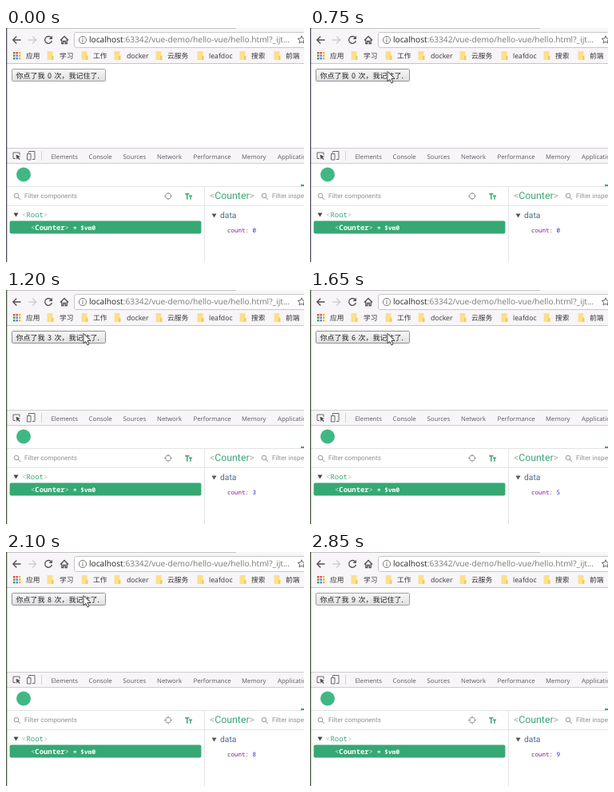
Write an HTML page that moves like this. It is 373 by 293 pixels and loops after 3.15 s.

```html
<!DOCTYPE html>
<html lang="zh-CN">
<head>
<meta charset="utf-8">
<title>Counter demo</title>
<style>
  html, body { margin: 0; width: 100%; height: 100%; overflow: hidden; background: #fff; }
  svg { display: block; width: 373px; height: 293px; }
  text { white-space: pre; text-rendering: geometricPrecision; }
  .ui { font-family: "Open Sans", "Noto Sans CJK SC", "Noto Sans CJK", sans-serif; }
  .cjk { font-family: "Noto Sans CJK SC", "Noto Sans CJK", sans-serif; }
  .vue { font-family: Roboto, sans-serif; }
  .mono { font-family: "Noto Sans Mono", "DejaVu Sans Mono", monospace; }
  .marks { font-size: 8.7px; fill: #333; }
  .tabs { font-size: 7.8px; fill: #5c5a60; }
  .hint { font-size: 8.2px; fill: #909090; }
  .line { fill: none; stroke-width: 1; shape-rendering: crispEdges; }
  .icon { fill: none; stroke: #505050; stroke-width: 1.3; }
  .edge { fill: #50505c; animation: edge 3150ms step-end infinite; }
  @keyframes edge { 28.5714% { fill: #4d5c43; } }
</style>
</head>
<body>
<svg viewBox="0 0 373 293">
  <defs>
    <linearGradient id="face" x2="0" y2="1">
      <stop stop-color="#f8f8f8"/>
      <stop offset="1" stop-color="#e0dfe2"/>
    </linearGradient>
    <g id="folder">
      <path d="M.5 0h7v11h-7z" fill="#fbe08a"/>
      <path d="M6 6h2.500v5H6z" fill="#f1cc5c"/>
    </g>
    <g id="lens" fill="none" stroke="#999" stroke-width="1">
      <circle r="2.8"/><path d="M2 2l3 3"/>
    </g>
  </defs>

  <!-- Browser bar -->
  <rect width="373" height="45" fill="#f7f5f7"/>
  <path class="line" d="M0 .5h288" stroke="#c4c2c6"/>
  <g class="icon">
    <path d="M18.5 15H9M13.3 10.5L8.8 15l4.5 4.5"/>
    <path d="M28 15h9.5M33.2 10.5l4.5 4.5l-4.5 4.5" stroke="#cfcdd0"/>
    <path d="M56.6 12.2A4.4 4.4 0 1 0 57.4 16"/>
    <path d="M57.9 9.8v4.2h-4.2z" fill="#505050" stroke="none"/>
    <path d="M68 15.5l5-5l5 5M69.8 14.5v5h2v-3h2.4v3h2v-5"/>
  </g>
  <rect x="85.5" y="5.5" width="300" height="19" rx="2.5" fill="#fff" stroke="#c9c7cb"/>
  <circle cx="96" cy="15" r="4.6" fill="none" stroke="#777"/>
  <path d="M96 12.2v1.3M96 14.3v3.4" stroke="#777" stroke-width="1.1"/>
  <text class="ui" x="104" y="18.3" font-size="10.2" fill="#777"><tspan fill="#222">localhost</tspan>:63342/vue-demo/hello-vue/hello.html?_ijt...</text>
  <path d="M370 9.800l1.400 3.200l3.400 .3l-2.600 2.300l.8 3.400l-3-1.800l-3 1.800l.8-3.400l-2.600-2.300l3.400-.3z" fill="none" stroke="#666"/>

  <!-- Bookmarks -->
  <g id="apps"></g>
  <g class="ui marks">
    <text x="25" y="38">应用</text>
    <use href="#folder" x="51" y="29"/><text x="67" y="38">学习</text>
    <use href="#folder" x="94" y="29"/><text x="109" y="38">工作</text>
    <use href="#folder" x="135" y="29"/><text x="151" y="38">docker</text>
    <use href="#folder" x="187" y="29"/><text x="202" y="38">云服务</text>
    <use href="#folder" x="239" y="29"/><text x="254" y="38">leafdoc</text>
    <use href="#folder" x="292" y="29"/><text x="307" y="38">搜索</text>
    <use href="#folder" x="335" y="29"/><text x="350" y="38">前端</text>
  </g>
  <path class="line" d="M0 44.5h373" stroke="#c6c4c8"/>

  <!-- Page -->
  <rect id="button" x="7.5" y="51.5" width="117" height="15" rx="1" fill="url(#face)" stroke="#a0a0a0"/>
  <text class="cjk" x="12.5" y="62.6" font-size="9" word-spacing="1.5" fill="#222">你点了我 <tspan id="clicks">0</tspan> 次，我记住了.</text>

  <!-- Developer tools -->
  <rect y="150" width="373" height="20" fill="#f7f5f7"/>
  <path class="line" d="M0 150.5h373M0 169.5h373" stroke="#cfcdd1"/>
  <path class="line" d="M44.5 154v12" stroke="#d8d6da"/>
  <g class="icon" style="stroke: #6a6a6a; stroke-width: 1">
    <path d="M12 163.5H9v-7.5h8v3"/>
    <path d="M12.5 158.5l5.5 2.5l-2.3 .8l2 2.5l-1 .8l-2-2.4l-1.2 2z" fill="#505050" stroke="none"/>
    <path d="M28.5 156.5v-2h7.5v10h-3M26.5 157.5h4.5v7.5h-4.5z"/>
  </g>
  <g class="ui tabs">
    <text x="56.5" y="163.5">Elements</text>
    <text x="103.5" y="163.5">Console</text>
    <text x="146.5" y="163.5">Sources</text>
    <text x="189" y="163.5">Network</text>
    <text x="234.5" y="163.5">Performance</text>
    <text x="295" y="163.5">Memory</text>
    <text x="340" y="163.5">Application</text>
  </g>

  <!-- Component inspector -->
  <circle cx="22" cy="183.5" r="9" fill="#41b883"/>
  <rect x="369" y="196" width="4" height="2" fill="#3ba776"/>
  <path class="line" d="M0 198.500h373M0 222.500h373M248.500 199v94" stroke="#e4e4e4"/>

  <use href="#lens" x="13" y="210"/>
  <text class="vue hint" x="23" y="213.3">Filter components</text>
  <g fill="none" stroke="#999">
    <circle cx="203" cy="210.5" r="3.5"/>
    <path d="M203 205.5v2.5M203 213v2.5M198 210.5h2.5M205.5 210.5h2.5"/>
  </g>
  <path d="M224 207.7h5.5M226.75 207.7v7M229 210.2h4M231 210.2v4.5" fill="none" stroke="#3ba776" stroke-width="1.5"/>

  <text class="vue" x="255" y="214" font-size="12.3" fill="#b0b0b0">&lt;<tspan fill="#3ba776">Counter</tspan>&gt;</text>
  <use href="#lens" x="323" y="210"/>
  <text class="vue hint" x="333" y="213.3">Filter inspected data</text>

  <path d="M9.5 231.5h6l-3 5z" fill="#444"/>
  <text class="mono" x="20" y="237" font-size="9" fill="#b8b8b8">&lt;<tspan fill="#3ba776">Root</tspan>&gt;</text>
  <rect x="4.6" y="241.6" width="239.8" height="15.8" rx="2.2" fill="#36a873"/>
  <text class="mono" x="31" y="252.5" font-size="8.9" fill="#cfeadd">&lt;<tspan fill="#fff" font-weight="600">Counter</tspan>&gt;</text>
  <text class="mono" x="84" y="252.5" font-size="7.8" font-weight="600" fill="#fff">= $vm0</text>

  <path d="M257.5 232.5h6l-3 5z" fill="#555"/>
  <text class="vue" x="268" y="238" font-size="10.3" fill="#486887">data</text>
  <text class="mono" x="277" y="256" font-size="7.5" fill="#881391">count: <tspan id="count" fill="#1c2fc4">0</tspan></text>

  <rect class="edge" width="1.3" height="293"/>
  <path id="cursor" d="M0 0V12.5L2.9 9.8L4.9 14.5L7 13.6L5 9H9Z" fill="#fff" stroke="#333" stroke-width=".9" visibility="hidden"/>
</svg>
<script>
  const LOOP = 3150, STEP = 150;
  const $ = id => document.getElementById(id);
  const clamp = (v, lo, hi) => Math.min(hi, Math.max(lo, v));

  const colors = ['#dc4a3d', '#dc4a3d', '#e9b52c', '#3c9a57', '#4a80d9', '#e9b52c', '#3c9a57', '#4a80d9', '#e9b52c'];
  $('apps').innerHTML = colors.map((c, i) =>
    `<rect x="${9 + i % 3 * 3.5}" y="${30 + Math.floor(i / 3) * 3.5}" width="2.4" height="2.4" fill="${c}"/>`).join('');

  // One click per step from step 6; the devtools readout pauses once, then the button does.
  function draw(step) {
    const ticks = clamp(step - 5, 0, 10);
    $('clicks').textContent = ticks > 6 ? ticks - 1 : ticks;
    $('count').textContent = ticks > 5 ? ticks - 1 : ticks;

    const over = step >= 1 && step < 18;
    const y = clamp(46 + step * 2.5, 48, 54.5);
    $('cursor').setAttribute('visibility', over ? 'visible' : 'hidden');
    $('cursor').setAttribute('transform', `translate(97 ${y})`);
    $('button').setAttribute('stroke', over ? '#8f8f98' : '#a0a0a0');
  }

  let last = -1;
  function frame() {
    const step = Math.floor(performance.now() % LOOP / STEP);
    if (step !== last) draw(last = step);
    requestAnimationFrame(frame);
  }
  frame();
</script>
</body>
</html>
```
